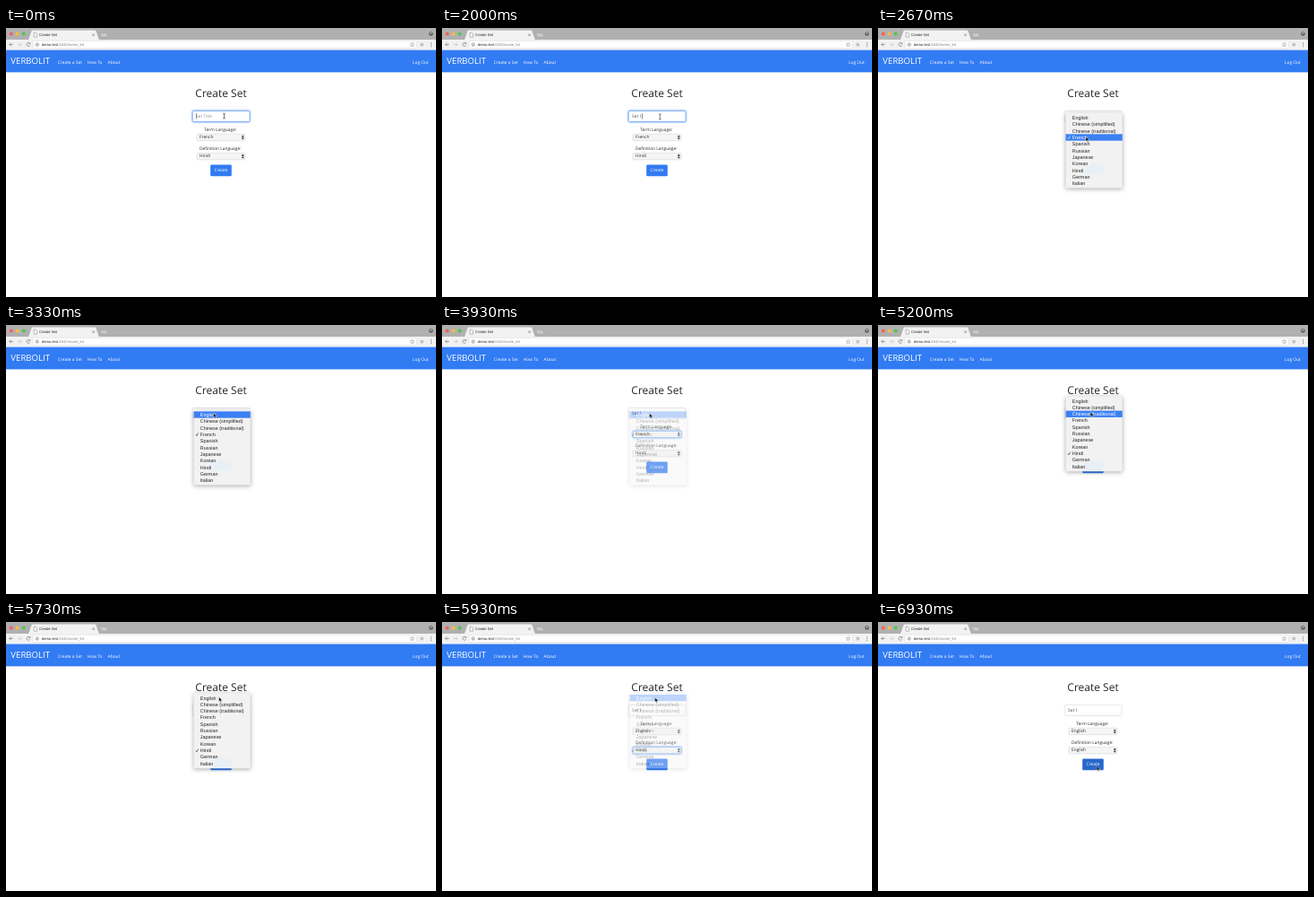
An HTML page that plays this animation: 480x300 px, repeating every 7070 ms.

```html
<!DOCTYPE html>
<html lang="en">
<head>
<meta charset="utf-8">
<title>Create Set</title>
<style>
  html, body { margin: 0; width: 100%; height: 100%; overflow: hidden; background: #fff; }
  svg { display: block; width: 480px; height: 300px; }
  text { font: 4.85px "Open Sans", sans-serif; fill: #24282c; white-space: pre; text-rendering: geometricPrecision; }
  .mid { text-anchor: middle; }
  .light { fill: #fff; }
  .chrome { font: 4.2px "Liberation Sans", sans-serif; }
  #menu text { font: 5.45px "Liberation Sans", sans-serif; fill: #222; }
  #menu .on { fill: #fff; }
  #menu { filter: drop-shadow(0 1.5px 2.5px rgba(0, 0, 0, .35)); }
  .box { stroke: #c9ced4; stroke-width: .5; }
  .focus { stroke: #78acf2; stroke-width: .9; filter: drop-shadow(0 0 .8px #6aa6fa); }
  .icon { fill: none; stroke: #666; stroke-width: .6; }
</style>
</head>
<body>
<svg viewBox="0 0 480 300">
  <!-- browser window -->
  <rect width="480" height="14" fill="#b0b0b0"/>
  <circle cx="5.8" cy="6.6" r="2" fill="#f4605a"/>
  <circle cx="12.8" cy="6.6" r="2" fill="#f6be40"/>
  <circle cx="19.8" cy="6.6" r="2" fill="#4ec650"/>
  <path d="M25 13.5L28.5 3.5Q29 2.5 30 2.5H99Q100 2.5 100.5 3.5L104 13.5Z" fill="#f2f2f2"/>
  <path d="M104.5 5.5H112L114 10H106.5Z" fill="#c8c8c8" stroke="#999" stroke-width=".4"/>
  <path d="M31.2 5.2H33.4L34.6 6.4V10.2H31.2Z" fill="#fff" stroke="#777" stroke-width=".5"/>
  <text class="chrome" x="37" y="9.2">Create Set</text>
  <path class="icon" d="M96.3 6.4l2.6 2.6m0-2.6l-2.6 2.6"/>
  <circle cx="474.3" cy="6.5" r="2.3" fill="#5c5c5c"/>
  <circle cx="474.3" cy="5.8" r=".9" fill="#ccc"/>
  <rect y="13" width="480" height="11.8" fill="#f2f2f2"/>
  <path class="icon" d="M8 18.4H3.8m1.9-1.9l-1.9 1.9l1.9 1.9"/>
  <path class="icon" style="stroke:#bbb" d="M13 18.4h4.2m-1.9-1.9l1.9 1.9l-1.9 1.9"/>
  <path class="icon" d="M26.6 17.4a1.9 1.9 0 1 0 .1 1.7m.2-3v1.5h-1.5"/>
  <rect x="30" y="14.3" width="428.5" height="8.4" rx="1" fill="#fff" stroke="#ccc" stroke-width=".4"/>
  <circle class="icon" cx="34.8" cy="18.5" r="1.6" stroke-width=".4"/>
  <path class="icon" d="M34.8 18.2v1.2"/>
  <text class="chrome" x="39.8" y="20">demo.test<tspan fill="#8a8a8a">:8040/make_list</tspan></text>
  <path class="icon" style="stroke-width:.4" d="M453.5 16.2l.7 1.5l1.6.2l-1.2 1.1l.3 1.6l-1.4-.8l-1.4.8l.3-1.6l-1.2-1.1l1.6-.2Z"/>
  <rect x="462.4" y="16.8" width="3.6" height="3.6" fill="#c4c4c4"/>
  <path d="M474.5 16.3v.9m0 .9v.9m0 .9v.9" stroke="#666" stroke-width=".9"/>

  <!-- page -->
  <rect y="24.6" width="480" height="24.8" fill="#317bf3"/>
  <text class="light" x="5.3" y="39.6" style="font-size:9.65px">VERBOLIT</text>
  <text class="light" x="57.8" y="39.6">Create a Set</text>
  <text class="light" x="90.8" y="39.6">How To</text>
  <text class="light" x="113.6" y="39.6">About</text>
  <text class="light" x="454" y="39.6">Log Out</text>
  <text class="mid" x="240" y="76.7" style="font-size:12px">Create Set</text>
  <rect id="input" class="box" x="208.2" y="92.4" width="63.8" height="12.2" rx="1.2" fill="#fff"/>
  <text id="title" x="212" y="99.8"></text>
  <rect id="caret" y="95.3" width=".5" height="6.2" fill="#222"/>
  <text class="mid" x="239.2" y="115">Term Language:</text>
  <text class="mid" x="239.2" y="136.4">Definition Language:</text>
  <g id="selects"></g>
  <rect id="button" x="228.2" y="152.6" width="23.6" height="12.6" rx="1.2"/>
  <text class="mid light" x="240" y="160.3">Create</text>

  <g id="menu">
    <rect x="209.6" y="-5.2" width="63.2" height="83.8" rx="1.4" fill="#f2f2f2"/>
    <ellipse id="tint" cx="240" rx="13" ry="6" fill="#e9f0f5"/>
    <rect id="hover" x="209.6" width="63.2" height="7.33" fill="#3c80f4"/>
    <g id="rows"></g>
    <path id="check" d="M211.8 .2l1.1 1.4l1.8-3.2" fill="none" stroke="#222" stroke-width=".65"/>
  </g>
  <path id="beam" d="M-1.3-3Q0-3 0-2.2Q0-3 1.3-3M0-2.2V2.2M-1.3 3Q0 3 0 2.2Q0 3 1.3 3" fill="none" stroke="#222" stroke-width=".6"/>
  <path id="arrow" d="M0 0V5.4L1.3 4.2L2.2 6.2L3.1 5.8L2.2 3.9H3.9Z" fill="#111" stroke="#fff" stroke-width=".4"/>
</svg>
<script>
const LOOP = 7070, TICK = 200 / 3, ROW = 7.33;
const languages = ["English", "Chinese (simplified)", "Chinese (traditional)", "French", "Spanish",
  "Russian", "Japanese", "Korean", "Hindi", "German", "Italian"];
const $ = id => document.getElementById(id);
const place = (el, x, y) => el.setAttribute("transform", `translate(${x} ${y})`);
const show = (el, on) => { el.style.display = on ? "" : "none"; };
const ramp = (t, from, to) => Math.min(1, Math.max(0, (t - from) / (to - from)));

// typed text by time
const typing = [[533, "S"], [800, "Se"], [1000, "Set"], [1333, "Set "], [1533, "Set 1"]];

// pointer stops: time, x, y
const stops = [[1930, 243.5, 98], [2000, 243.3, 99], [2530, 232, 121], [3000, 232, 121], [3330, 231.5, 98],
  [3930, 231.5, 98], [4400, 238.3, 143.4], [4530, 238.5, 144.6], [5000, 238.3, 144.6], [5200, 237.2, 97],
  [5530, 237.6, 83.5], [5930, 237.6, 83.5], [6330, 244, 160.3]];

// each dropdown: menu top row centre, checked row, opening and picking times
const menus = [
  { y: 100, checked: 3, open: 2600, pick: 3733 },
  { y: 84.6, checked: 8, open: 4667, pick: 5733 }
];

$("rows").innerHTML = languages.map((name, i) => `<text x="216.8" y="${i * ROW + 1.9}">${name}</text>`).join("");
$("selects").innerHTML = [118.2, 139.4].map(y => `
  <rect class="box" x="213" y="${y}" width="54" height="7.5" rx="1" fill="#f5f5f5"/>
  <text x="216" y="${y + 5}"></text>
  <path d="M262.8 ${y + 3.3}l1.5-2.1l1.5 2.1ZM262.8 ${y + 4.3}l1.5 2.1l1.5-2.1Z" fill="#222"/>`).join("");
const rowTexts = [...$("rows").children];
const selectBoxes = $("selects").querySelectorAll("rect");
const selectTexts = $("selects").querySelectorAll("text");

function pointerAt(t) {
  const next = stops.findIndex(s => s[0] > t);
  if (next === 0) return stops[0].slice(1);
  if (next < 0) return stops[stops.length - 1].slice(1);
  const a = stops[next - 1], b = stops[next];
  const k = ramp(t, a[0], b[0]);
  return [a[1] + (b[1] - a[1]) * k, a[2] + (b[2] - a[2]) * k];
}

function drawMenu(t, pointerY) {
  const menu = menus.find(m => t >= m.open - 1 && t < m.pick + 260);
  show($("menu"), menu);
  if (!menu) return;
  place($("menu"), 0, menu.y);
  $("menu").style.opacity = 1 - ramp(t, menu.pick + 67, menu.pick + 267);
  const blink = t >= menu.pick - 1 && t < menu.pick + 60;
  const hovered = blink ? -1 : Math.round((pointerY + .5 - menu.y) / ROW);
  show($("hover"), !blink);
  $("hover").setAttribute("y", (hovered - .5) * ROW);
  rowTexts.forEach((row, i) => row.classList.toggle("on", i === hovered));
  place($("check"), 0, menu.checked * ROW);
  $("check").style.stroke = hovered === menu.checked ? "#fff" : "#222";
  $("tint").setAttribute("cy", 157 - menu.y);
}

function draw(t) {
  const [x, y] = pointerAt(t);
  const typed = typing.filter(k => t >= k[0] - 1).map(k => k[1]).pop();
  const editing = t < menus[0].open - 1;
  const title = $("title");
  title.textContent = typed || "Set Title";
  title.style.fill = typed ? "#495057" : "#8b9299";
  show($("caret"), editing && (typed || t < 60));
  $("caret").setAttribute("x", 212 + (typed ? title.getComputedTextLength() : 0));
  $("input").classList.toggle("focus", editing);

  const ends = [menus[1].open, 6533];
  menus.forEach((m, i) => {
    selectBoxes[i].classList.toggle("focus", t >= m.open - 1 && t < ends[i] - 1);
    selectTexts[i].textContent = languages[t >= m.pick + 260 ? 0 : m.checked];
  });

  const press = .35 * ramp(t, 6200, 6330) + .65 * ramp(t, 6533, 6733);
  $("button").style.fill = `rgb(${48 - 8 * press}, ${122 - 18 * press}, ${241 - 37 * press})`;

  drawMenu(t, y);
  const beam = editing && y < 105;
  show($("beam"), beam);
  show($("arrow"), !beam);
  place($(beam ? "beam" : "arrow"), x, y);
}

const start = performance.now();
function tick() {
  const t = (performance.now() - start) % LOOP;
  draw(Math.floor(t / TICK + .06) * TICK);
  requestAnimationFrame(tick);
}
tick();
</script>
</body>
</html>
```
